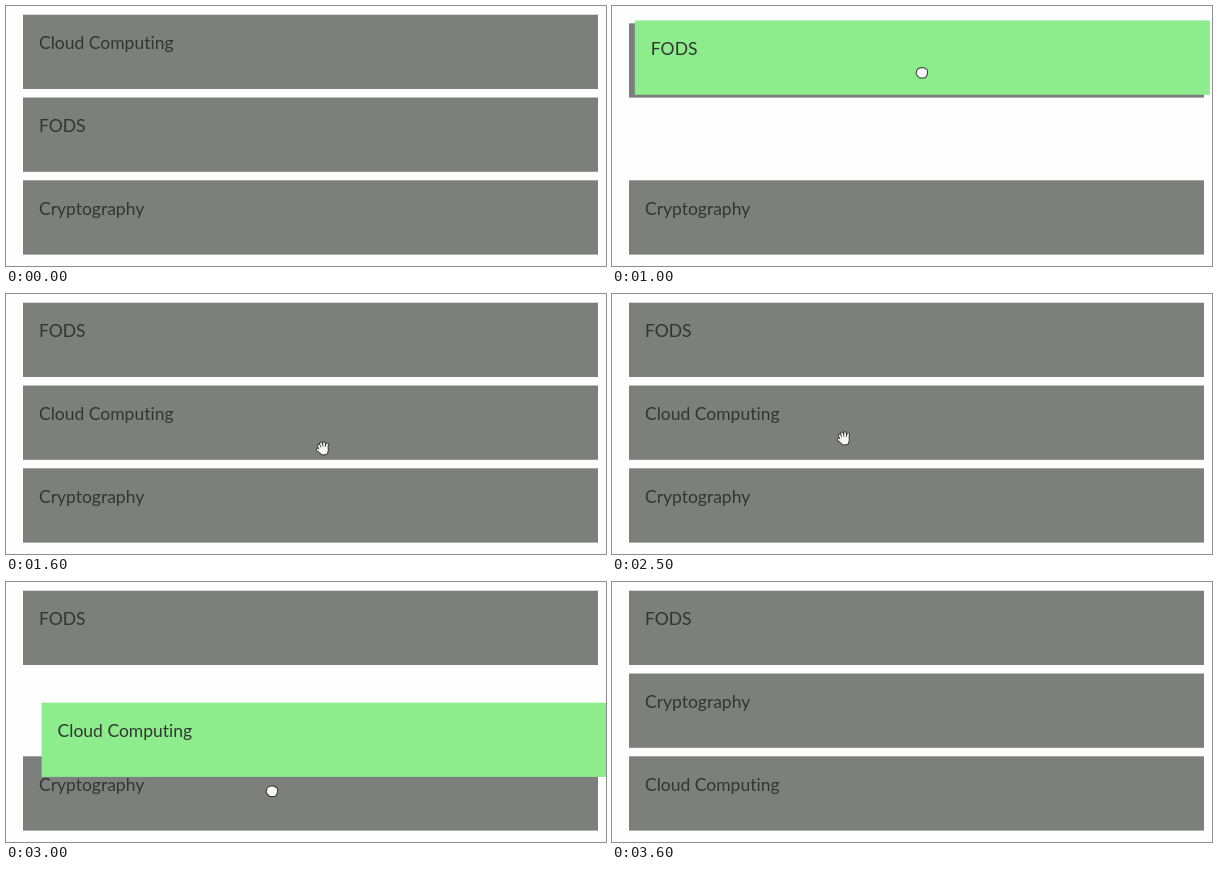
Write an HTML page that moves like this. It is 600x260 px and loops after 3.8 s.

```html
<!DOCTYPE html>
<html lang="en">
<head>
<meta charset="utf-8">
<title>Sortable list</title>
<style>
  html, body { margin: 0; width: 100%; height: 100%; overflow: hidden; background: #fdfefd; }
  svg { display: block; width: 600px; height: 260px; }
  text { font: 17.5px Lato, sans-serif; font-variant-ligatures: none; fill: #323532; }
  .card rect { fill: #7d7f7c; }
  .card.dragged rect { fill: #8dec8b; }
  .outline, .skin { stroke-linecap: round; stroke-linejoin: round; }
  .outline { fill: #333; stroke: #333; stroke-width: 3.8; }
  .skin { fill: #f6f6f6; stroke: #f6f6f6; stroke-width: 1.9; }
</style>
</head>
<body>
<svg viewBox="0 0 600 260">
  <defs>
    <path id="hand" d="M-3 0H4V3L2.5 6H-1.5L-4 3ZM-2.5 4.5L-6 .8M-3 1L-4.2 -3.4M-.8 0L-1.5 -5.2M1.5 0L1.8 -5.2M3.8 1L5 -3.2"/>
    <path id="fist" d="M-3.5 -2.5L-1 -3.5H1.5L4 -2V1.5L2.5 4H-2L-4.5 1Z"/>
  </defs>
  <g id="cards"></g>
  <g id="cursor">
    <g id="open" transform="rotate(-8) scale(.92)">
      <use href="#hand" class="outline"/>
      <use href="#hand" class="skin"/>
    </g>
    <g id="closed">
      <use href="#fist" class="outline"/>
      <use href="#fist" class="skin"/>
    </g>
  </g>
</svg>
<script>
const SVG_NS = "http://www.w3.org/2000/svg";
const LOOP = 3800, STEP = 100;
const byId = id => document.getElementById(id);
const slot = n => ({ x: 17, y: 8.7 + n * 82.8 });

const linear = k => k;
const easeOut = k => 1 - (1 - k) ** 2;
const smooth = k => k * k * (3 - 2 * k);

// A move runs from wherever the previous one ended.
const move = (at, ms, to, ease = linear) => ({ at, ms, to, ease });
const point = (x, y) => ({ x, y });

function follow(start, moves, t) {
  return moves.reduce((from, { at, ms, to, ease }) => {
    const k = ease(Math.min(1, Math.max(0, (t - at) / ms)));
    return point(from.x + (to.x - from.x) * k, from.y + (to.y - from.y) * k);
  }, start);
}

// A drag pulls a card away, then lets it settle into a slot while still green.
const drag = (at, pull, ms, to, n) =>
  [move(at, ms, to), move(at + pull, 300, slot(n), smooth)];
const shift = (at, n) => move(at, 250, slot(n), smooth);

const cards = [
  { label: "Cryptography", home: 2, moves: [shift(3000, 1)] },
  { label: "Cloud Computing", home: 0, green: [2800, 3600],
    moves: [shift(950, 1), ...drag(2700, 300, 300, point(35.6, 120.6), 2)] },
  { label: "FODS", home: 1, green: [900, 1600],
    moves: drag(800, 400, 250, point(24.3, -4.8), 0) }
];

const cursor = {
  start: point(590, 169),
  shown: [400, 3600],
  moves: [
    move(400, 400, point(310, 141), easeOut),
    move(800, 250, point(310, 48)),
    move(1200, 200, point(318, 200)),
    move(1400, 100, point(317, 154)),
    move(1700, 200, point(272, 170)),
    move(1900, 100, point(252, 159)),
    move(2300, 200, point(232, 144)),
    move(2700, 300, point(266, 209)),
    move(3000, 500, point(575, 152), smooth)
  ]
};
const grips = [[900, 1300], [2800, 3200]];

function add(parent, tag, attrs, text = "") {
  const node = document.createElementNS(SVG_NS, tag);
  for (const key in attrs) node.setAttribute(key, attrs[key]);
  node.textContent = text;
  return parent.appendChild(node);
}

for (const card of cards) {
  card.node = add(byId("cards"), "g", { class: "card" });
  add(card.node, "rect", { width: 575, height: 74.3 });
  add(card.node, "text", { x: 16, y: 34.5 }, card.label);
}

const within = (t, [start, end]) => t >= start && t < end;
const place = (node, { x, y }) => node.setAttribute("transform", `translate(${x} ${y})`);
const show = (node, visible) => node.setAttribute("visibility", visible ? "visible" : "hidden");

function render(t) {
  for (const { node, home, moves, green } of cards) {
    place(node, follow(slot(home), moves, t));
    node.classList.toggle("dragged", Boolean(green) && within(t, green));
  }
  const visible = within(t, cursor.shown);
  const gripping = grips.some(span => within(t, span));
  place(byId("cursor"), follow(cursor.start, cursor.moves, t));
  show(byId("open"), visible && !gripping);
  show(byId("closed"), visible && gripping);
}

// The motion advances ten times a second.
function tick() {
  const t = performance.now() % LOOP;
  render(Math.floor(t / STEP) * STEP);
  requestAnimationFrame(tick);
}
tick();
</script>
</body>
</html>
```
